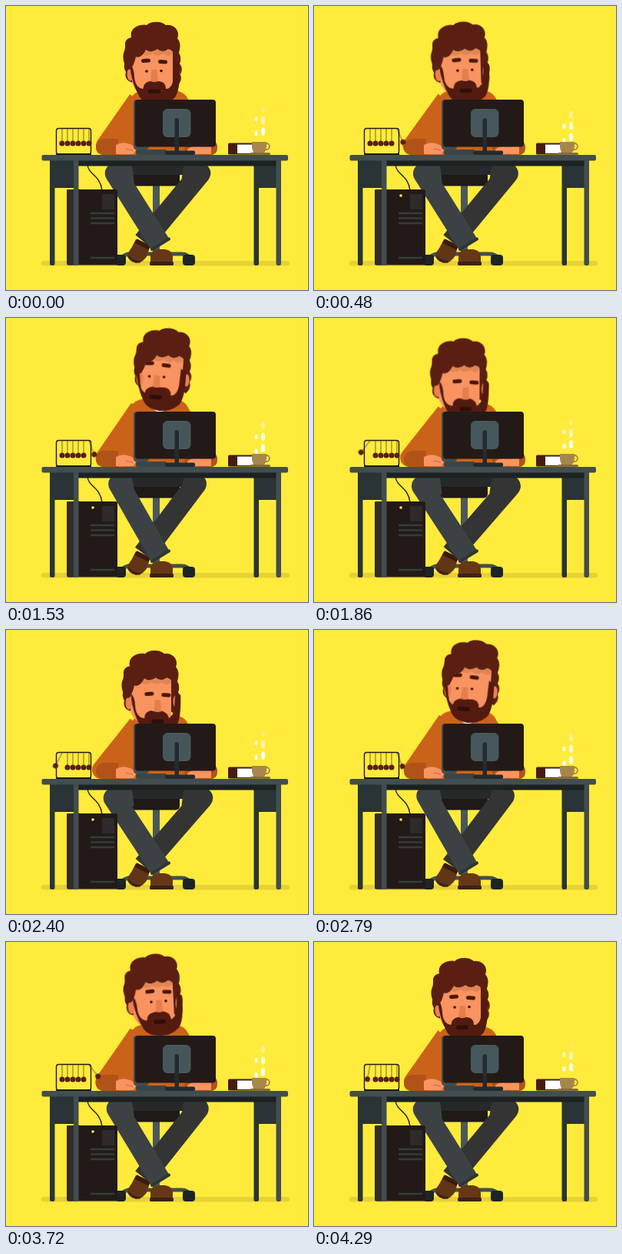
Write an HTML page without scripts that moves like this. It is 393 by 370 pixels and loops after 4320 ms.

```html
<!DOCTYPE html>
<html lang="en">
<head>
<meta charset="utf-8">
<title>At the desk</title>
<style>
html, body { margin: 0; width: 100%; height: 100%; overflow: hidden; background: #ffeb3b; }
svg { display: block; width: 393px; height: 370px; }

/* Everything runs forward for 2160 ms, then backward. */
.head, .turn, .brows, .eyes, .torso, .arm, .shin-l, .shin-r, .led, .ball-l, .ball-r, .steam {
  animation: 2160ms ease-in-out infinite alternate;
}
.head { animation-name: head; transform-origin: 192px 118px; }
.turn { animation-name: turn; }
.brows { animation-name: brows; }
.eyes { animation-name: blink; animation-timing-function: step-end; }
.torso { animation-name: torso; }
.arm { animation-name: arm; }
.shin-l { animation-name: shinL; }
.shin-r { animation-name: shinR; }
.led { animation-name: led; animation-timing-function: step-end; }
.ball-l { animation-name: ballL; transform-origin: 73px 160px; }
.ball-r { animation-name: ballR; transform-origin: 108px 160px; }
.steam { animation-name: rise; animation-timing-function: linear; }

@keyframes head {
  0% { transform: translate(0, 0) rotate(0deg); }
  13.89% { transform: translate(0, 3px) rotate(-1deg); }
  38.89% { transform: translate(4.5px, -11px) rotate(-4deg); }
  51.39% { transform: translate(6px, 0) rotate(0deg); }
  66.67% { transform: translate(11px, -9px) rotate(4.3deg); }
  88.89% { transform: translate(-2px, 6px) rotate(0deg); }
  100% { transform: translate(-1px, 2px) rotate(0deg); }
}
@keyframes turn {
  0% { transform: translate(0, 0); }
  13.89% { transform: translate(1.5px, 0); }
  38.89% { transform: translate(3.2px, -1.5px); }
  51.39% { transform: translate(-2.5px, 0); }
  66.67% { transform: translate(-5px, 0); }
  88.89% { transform: translate(3.2px, 1px); }
  100% { transform: translate(2px, 0); }
}
@keyframes brows {
  0%, 51.39% { transform: translateY(0); }
  66.67% { transform: translateY(-4px); }
  88.89% { transform: translateY(4px); }
  100% { transform: translateY(1px); }
}
@keyframes blink {
  0% { opacity: 1; }
  85.5% { opacity: 0; }
  92.5%, 100% { opacity: 1; }
}
@keyframes torso {
  0% { transform: translateY(0); }
  13.89% { transform: translateY(1px); }
  38.89% { transform: translateY(-5px); }
  51.39% { transform: translateY(-1px); }
  66.67% { transform: translateY(-5px); }
  88.89%, 100% { transform: translateY(1px); }
}
@keyframes arm {
  0% { d: path("M171 122L129 182L148 184"); }
  13.89% { d: path("M171 123L127 182L148 184"); }
  38.89% { d: path("M172 117L129 182L148 184"); }
  51.39% { d: path("M171 121L125 182L148 184"); }
  66.67% { d: path("M173 117L129 182L148 184"); }
  88.89%, 100% { d: path("M171 123L124 182L148 184"); }
}
@keyframes shinL {
  0% { d: path("M165 215L142.5 218L201 311"); }
  13.89% { d: path("M165 216L141.5 219L201 311"); }
  38.89% { d: path("M165 213L146.5 216L201 311"); }
  51.39% { d: path("M165 216L141.5 219L201 311"); }
  66.67% { d: path("M165 213L147.5 216L201 311"); }
  88.89% { d: path("M165 216L140.5 219L201 311"); }
  100% { d: path("M165 215L141.5 218L201 311"); }
}
@keyframes shinR {
  0% { d: path("M230 215L252.5 218L179 307"); }
  13.89% { d: path("M230 216L253.5 219L179 307"); }
  38.89% { d: path("M230 213L247.5 216L179 307"); }
  51.39% { d: path("M230 216L253.5 219L179 307"); }
  66.67% { d: path("M230 213L246.5 216L179 307"); }
  88.89% { d: path("M230 216L255.5 219L179 307"); }
  100% { d: path("M230 215L253.5 218L179 307"); }
}
@keyframes led {
  0% { opacity: 0; }
  18% { opacity: 1; }
  46% { opacity: 0; }
  68% { opacity: 1; }
  96%, 100% { opacity: 0; }
}
/* The end balls take turns, 400 ms a swing. */
@keyframes ballL {
  0%, 37.04%, 74.07% { transform: rotate(0deg); animation-timing-function: cubic-bezier(.3,.55,.6,1); }
  9.26%, 46.3%, 83.33% { transform: rotate(42deg); animation-timing-function: cubic-bezier(.4,0,.7,.45); }
  18.52%, 55.56%, 92.59%, 100% { transform: rotate(0deg); }
}
@keyframes ballR {
  0% { transform: rotate(0deg); }
  18.52%, 55.56%, 92.59% { transform: rotate(0deg); animation-timing-function: cubic-bezier(.3,.55,.6,1); }
  27.78%, 64.81% { transform: rotate(-38deg); animation-timing-function: cubic-bezier(.4,0,.7,.45); }
  37.04%, 74.07% { transform: rotate(0deg); }
  100% { transform: rotate(-36deg); }
}
@keyframes rise {
  from { stroke-dashoffset: var(--a); }
  to { stroke-dashoffset: var(--b); }
}
</style>
</head>
<body>
<svg viewBox="0 0 393 370">
  <defs>
    <linearGradient id="fade" gradientUnits="userSpaceOnUse" x1="0" y1="176" x2="0" y2="130">
      <stop offset="0" stop-color="#fff"/>
      <stop offset=".35" stop-color="#fff" stop-opacity=".95"/>
      <stop offset="1" stop-color="#fff" stop-opacity=".15"/>
    </linearGradient>
    <g id="ball">
      <path d="M0 160V177" stroke="#231a17" stroke-width=".6"/>
      <circle cy="179" r="3.5" fill="#5a1f12"/>
    </g>
  </defs>

  <rect width="393" height="370" fill="#ffeb3b"/>
  <rect x="46" y="332" width="323" height="6.5" rx="3" fill="#e6d335"/>

  <!-- chair -->
  <rect x="191" y="230" width="9" height="96" fill="#4b585a"/>
  <path d="M150 331Q152 323 162 323H228Q238 323 240 331" fill="none" stroke="#434f51" stroke-width="5"/>
  <g fill="#1d2426">
    <rect x="142" y="324" width="14" height="14" rx="4"/>
    <rect x="230" y="324" width="16" height="14" rx="4"/>
  </g>
  <rect x="160" y="200" width="66" height="34.500" rx="5" fill="#1f1917"/>
  <rect x="150" y="200" width="95" height="20" fill="#262929"/>

  <!-- legs -->
  <path d="M169 304L187 313L184 325Q178 335 169 335Q158 332 158 323Q164 315 169 304Z" fill="#623418"/>
  <path d="M169 306L187 315" stroke="#3a1c10" stroke-width="6"/>
  <path d="M159 326Q165 334 175 333" fill="none" stroke="#3e2114" stroke-width="2.5"/>
  <g fill="none" stroke-width="27.5" stroke-linejoin="round">
    <path class="shin-r" d="M230 215L252.5 218L179 307" stroke="#343434"/>
    <path class="shin-l" d="M165 215L142.5 218L201 311" stroke="#3c4244"/>
  </g>
  <path d="M190 317L212 303.500" stroke="#303536" stroke-width="4" stroke-linecap="round"/>
  <path d="M188 335V325Q190 317 199 317H207Q216 318 217 326V335Z" fill="#673616"/>
  <rect x="187" y="333" width="31" height="5" rx="1.5" fill="#3e2114"/>

  <!-- body -->
  <g class="torso">
    <path d="M138 198L162 124Q164 112 178 110H218Q234 111 238 124L250 205Z" fill="#cb621a"/>
    <path d="M185 109H214Q213 124 200 128Q187 124 185 109Z" fill="#fff"/>
    <path d="M225 124L263 178" stroke="#cb621a" stroke-width="22"/>
  </g>
  <path class="arm" d="M171 122L129 182L148 184" fill="none" stroke="#cb621a" stroke-width="24" stroke-linejoin="round"/>
  <path d="M146 173H127Q117 175 117 184Q117 192 125 194H146Z" fill="#b05318"/>
  <rect x="232" y="175" width="43" height="19" rx="8" fill="#b05318"/>
  <g fill="#f9935f">
    <path d="M143 181Q150 177 158 179Q167 181 169 188L166 193H143Z"/>
    <path d="M236 193V187Q241 182 250 183H267V193Z"/>
  </g>
  <path d="M156 186L165 188" stroke="#dc744a" stroke-width="1.5"/>

  <!-- head -->
  <g class="head">
    <path d="M164 45Q153 48 155 59Q152 66 155 73Q152 80 156 86Q154 94 160 98L170 102L172 45Z" fill="#5a1f12"/>
    <path d="M216 45Q228 50 225 61Q229 68 226 75Q231 82 227 89Q230 97 223 104L212 98Z" fill="#5a1f12"/>
    <ellipse cx="223" cy="87" rx="3.5" ry="8" fill="#ee8152"/>
    <path d="M164 50H217V104Q214 118 193 118Q170 118 164 100Z" fill="#f9935f"/>
    <path d="M165 55H217V62Q211 68 205 62Q198 67 191 62Q184 67 178 63Q171 70 165 68Z" fill="#e08554"/>
    <ellipse cx="162" cy="89" rx="4.5" ry="8.5" fill="#ee8152"/>
    <g class="turn">
      <path d="M161 76Q166 78 167 92Q168 107 179 108Q179 99 188 98Q193 100 198 98Q208 98 208 108Q216 108 218 94L219 72L226 78Q227 112 219 120Q209 129 195 129Q180 128 174 119Q163 100 161 76Z" fill="#531b10"/>
      <g class="turn">
        <path d="M189.500 83H196.500L198 99Q193 101 188 99Z" fill="#e67d4c"/>
        <path d="M178 110Q179 99 188 98Q193 100 198 98Q207 99 208 110Q193 114 178 110Z" fill="#531b10"/>
        <rect x="185" y="108.500" width="16" height="5.500" rx="2.700" fill="#2f0f09"/>
        <g class="eyes" fill="#35150d">
          <circle cx="183" cy="85" r="1.8"/>
          <circle cx="202" cy="84.5" r="1.8"/>
        </g>
        <g class="brows" stroke="#4a180d" stroke-width="5" stroke-linecap="round">
          <path d="M178.500 71.500L185.500 71M200.500 72.500L207.500 73"/>
        </g>
      </g>
    </g>
    <path d="M158 82C151 72 151 62 156 55C153 47 157 42 163 41C160 28 175 23 183 25C189 19 203 20 208 25C219 23 227 33 223 42C229 49 227 60 220 68Q219 57 211 56Q204 62 197 56Q189 62 182 57Q176 69 169 66Q166 80 161 83Z" fill="#5a1f12"/>
  </g>

  <!-- tower -->
  <path d="M106 207C108 221 122 219 125 240" fill="none" stroke="#231a17" stroke-width="1.4"/>
  <rect x="79" y="239" width="66" height="98.5" rx="2" fill="#231a17"/>
  <rect x="79" y="239" width="11" height="98.5" rx="2" fill="#322c2a"/>
  <rect x="125" y="245" width="16" height="20" fill="#2d2a29"/>
  <path d="M110 270H141M110 276.500H141M110 283H141M110 328H141" stroke="#353b3c" stroke-width="2.5"/>
  <circle class="led" cx="113" cy="247" r="1.8" fill="#ffee58"/>

  <!-- desk -->
  <g fill="#2a3436">
    <rect x="63" y="200" width="26" height="37"/>
    <rect x="328" y="200" width="25" height="37"/>
    <rect x="57" y="200" width="6.5" height="138" rx="2"/>
    <rect x="322.5" y="200" width="6.5" height="138" rx="2"/>
  </g>
  <rect x="88" y="200" width="270" height="8.5" fill="#1c2121"/>
  <g fill="#414d4f">
    <rect x="88" y="200" width="6.5" height="138" rx="2"/>
    <rect x="351.5" y="200" width="6.5" height="138" rx="2"/>
    <rect x="46.5" y="194" width="320.5" height="7.5" rx="2"/>
  </g>

  <!-- monitor and keyboard -->
  <rect x="169" y="187" width="40" height="7" rx="2" fill="#3b4648"/>
  <rect x="166" y="122" width="20" height="65" rx="4" fill="#414d4f"/>
  <rect x="168" y="122" width="105" height="61.5" rx="4" fill="#231a17"/>
  <rect x="204" y="134" width="36.5" height="37" rx="6" fill="#46575c"/>
  <rect x="219.5" y="146" width="5.5" height="46" rx="2.5" fill="#222b2f"/>
  <rect x="207" y="188.5" width="39" height="5.5" rx="2" fill="#222b2f"/>

  <!-- swinging balls -->
  <rect x="65.5" y="159.5" width="45" height="33.5" rx="3" fill="none" stroke="#231a17" stroke-width="1.4"/>
  <path d="M65 193H111" stroke="#231a17" stroke-width="2"/>
  <use href="#ball" x="80"/><use href="#ball" x="87"/><use href="#ball" x="94"/><use href="#ball" x="101"/>
  <g class="ball-l"><use href="#ball" x="73"/></g>
  <g class="ball-r"><use href="#ball" x="108"/></g>

  <!-- book, cup, steam -->
  <rect x="289" y="178.5" width="34" height="15" rx="1.5" fill="#451c12"/>
  <rect x="301" y="180.5" width="21" height="11.5" fill="#fff"/>
  <circle cx="339" cy="183" r="4" fill="none" stroke="#a5874a" stroke-width="1.8"/>
  <path d="M320 177H339V184Q338 192 332 192H327Q321 192 320 184Z" fill="#a5874a"/>
  <rect x="317" y="191" width="27" height="3" rx="1.5" fill="#8b6c38"/>
  <g fill="none" stroke="url(#fade)" stroke-width="4.5" stroke-linecap="round">
    <path class="steam" d="M325.5 175V139" stroke-dasharray="2 17" style="--a:-8;--b:-50.75"/>
    <path class="steam" d="M334.5 175V133" stroke-dasharray="6 9" style="--a:6.5;--b:-27.25"/>
  </g>
</svg>
</body>
</html>
```
